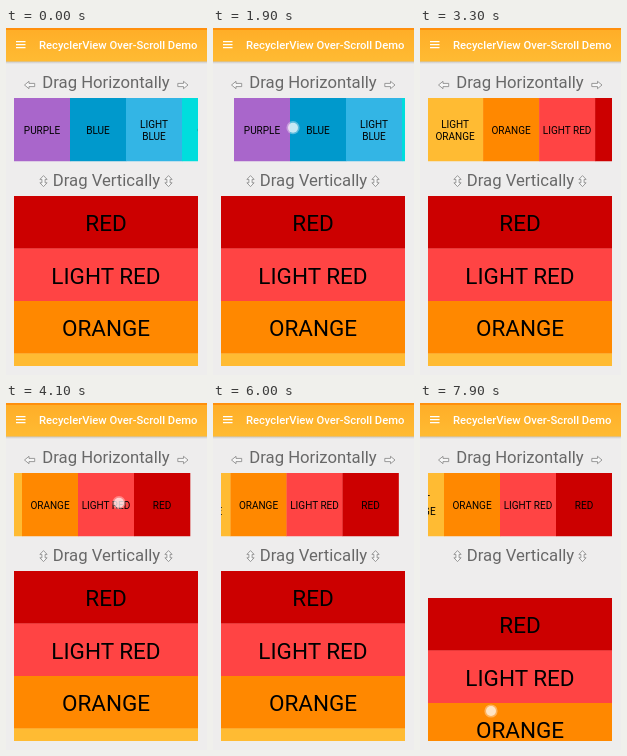
Animation, 201 px wide and 347 px high, one loop 8 s. Source, as an HTML page:

```html
<!DOCTYPE html>
<html lang="en">
<head>
<meta charset="utf-8">
<title>Over-scroll demo</title>
<style>
html, body { margin: 0; width: 100%; height: 100%; overflow: hidden; background: #eeeded; }
svg { display: block; width: 201px; height: 347px; }
text { font-family: Roboto, sans-serif; }
.head { font-size: 16.7px; fill: #686868; text-anchor: middle; }
.arrow { fill: #f6f6f6; stroke: #858585; stroke-width: .8; }
</style>
</head>
<body>
<svg viewBox="0 0 201 347">
  <defs>
    <linearGradient id="bar" x1="0" y1="0" x2="0" y2="1">
      <stop offset="0" stop-color="#ffad27"/>
      <stop offset="1" stop-color="#ffbb33"/>
    </linearGradient>
    <linearGradient id="shade" x1="0" y1="0" x2="0" y2="1">
      <stop offset="0" stop-color="#000" stop-opacity=".2"/>
      <stop offset="1" stop-color="#000" stop-opacity="0"/>
    </linearGradient>
    <clipPath id="rowClip"><rect x="8" y="70" width="184" height="63.5"/></clipPath>
    <clipPath id="colClip"><rect x="8" y="168" width="184" height="170"/></clipPath>
  </defs>
  <rect width="201" height="347" fill="#eeeded"/>
  <rect y="33" width="201" height="3" fill="url(#shade)"/>
  <rect width="201" height="33.5" fill="url(#bar)"/>
  <rect width="201" height="2" fill="#ff8f0c"/>
  <path d="M10 13.7h9.5M10 16.7h9.5M10 19.7h9.5" stroke="#fff" stroke-width="1.2"/>
  <text x="33" y="21" font-size="11.25" font-weight="500" fill="#fff">RecyclerView Over-Scroll Demo</text>
  <text class="head" x="100" y="60">Drag Horizontally</text>
  <text class="head" x="100.5" y="157.5">Drag Vertically</text>
  <path id="left" class="arrow" d="M18.5 57l4.5-3.7v2.1h5.7v3.2h-5.7v2.1z"/>
  <use href="#left" transform="matrix(-1 0 0 1 200.5 0)"/>
  <path id="updown" class="arrow" d="M37.5 147.6l3.6 3.8h-2v3.4h2l-3.6 3.8l-3.6-3.8h2v-3.4h-2z"/>
  <use href="#updown" x="125"/>
  <g clip-path="url(#rowClip)"><g id="row"></g></g>
  <g clip-path="url(#colClip)"><g id="col"></g></g>
  <g id="touch" fill="#fff">
    <circle r="6.6" opacity=".35"/>
    <circle r="5" opacity=".65"/>
  </g>
</svg>
<script>
const LOOP = 8000, STEP = 100, CELL = 56, CELL_H = 52.5;
const colors = [
  ['PURPLE', '#a966cb'], ['BLUE', '#0099cc'], ['LIGHT BLUE', '#33b5e5'], ['CYAN', '#00dddd'],
  ['GREEN', '#669900'], ['LIGHT GREEN', '#99cc00'], ['LIGHT ORANGE', '#ffbb33'],
  ['ORANGE', '#ff8800'], ['LIGHT RED', '#ff4444'], ['RED', '#cc0000']
];
const END = colors.length * CELL - 184;

// Horizontal pulls: press, release, settled, finger start, finger travel
const pulls = [
  [600, 1100, 1550, 41, 90],
  [1600, 2300, 2750, 41, 117],
  [3800, 4400, 4750, 137, -60],
  [4900, 5700, 6450, 136, -54]
];

const byId = id => document.getElementById(id);
const row = byId('row'), col = byId('col'), touch = byId('touch');

function add(parent, tag, attrs, content = '') {
  const el = document.createElementNS('http://www.w3.org/2000/svg', tag);
  for (const key in attrs) el.setAttribute(key, attrs[key]);
  el.textContent = content;
  parent.append(el);
}

function label(parent, content, x, y, size) {
  add(parent, 'text', { x, y, 'font-size': size, 'text-anchor': 'middle' }, content);
}

colors.forEach(([name, fill], i) => {
  const x = 8 + i * CELL, mid = x + CELL / 2;
  add(row, 'rect', { x, y: 70, width: CELL + .3, height: 63.5, fill });
  const lines = name.length > 9 ? name.split(' ') : [name];
  lines.forEach((line, n) => label(row, line, mid, 106 + (n - (lines.length - 1) / 2) * 11.6, 10));
});
[...colors].reverse().slice(0, 4).forEach(([name, fill], i) => {
  const y = 168 + i * CELL_H;
  add(col, 'rect', { x: 8, y, width: 184, height: CELL_H + .3, fill });
  label(col, name, 100, y + 35, 22.5);
});

const clamp = (t, a, b) => Math.min(1, Math.max(0, (t - a) / (b - a)));
const smooth = u => u * u * (3 - 2 * u);

function pose(t) {
  const scroll = END * smooth(clamp(t, 2900, 3400));
  const p = { x: -scroll, y: 0, finger: null };
  for (const [press, release, settled, from, travel] of pulls) {
    if (t < press || t >= settled) continue;
    const moved = travel * clamp(t, press + 100, release);
    p.x += moved / 3 * (1 - clamp(t, release, settled)) ** 2;
    if (t <= release) p.finger = [from + moved, 99.7];
  }
  if (t >= 2900 && t < 3200) p.finger = [147 - scroll, 100];
  if (t >= 6900) {
    const u = clamp(t, 7200, 7900);
    p.finger = [57 + 14 * u, 178 + 130 * u];
    p.y = 27 * u;
  }
  return p;
}

function draw(now) {
  const time = now % LOOP;
  const { x, y, finger } = pose(Math.floor(time / STEP) * STEP);
  row.setAttribute('transform', `translate(${x} 0)`);
  col.setAttribute('transform', `translate(0 ${y})`);
  touch.setAttribute('visibility', finger ? 'visible' : 'hidden');
  if (finger) touch.setAttribute('transform', `translate(${finger})`);
}

const start = performance.now();
function tick() {
  draw(performance.now() - start);
  requestAnimationFrame(tick);
}
tick();
</script>
</body>
</html>
```
